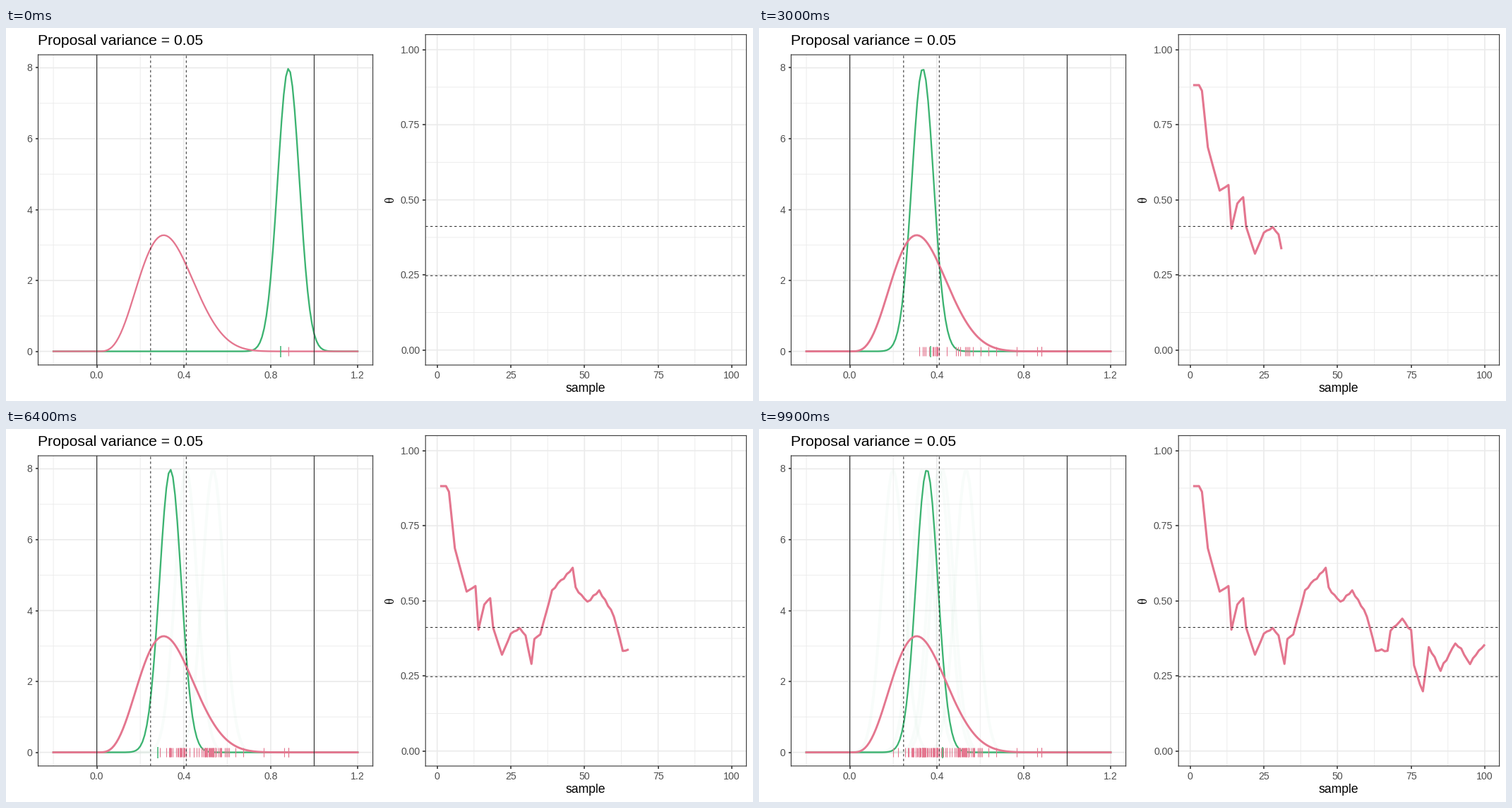
A matplotlib script for the animation above (10000 ms loop, 1058x529 px).

```python
import numpy as np
import matplotlib.pyplot as plt
from matplotlib.animation import FuncAnimation

W, H, DPI = 1058, 529, 100
PX = 72 / DPI  # points per pixel
PINK, GREEN = "#E4768F", "#3CB371"
GRID, DARK, LABEL = "#EBEBEB", "#333333", "#4D4D4D"
SD = 0.05
N = 100
BOUNDS = (0.2475, 0.4115)

# Turning points of the chain (sample: theta), joined by a slightly noisy walk.
TURNS = {3: .882, 4: .863, 6: .675, 10: .53, 13: .55, 14: .403, 16: .489,
         18: .51, 19: .411, 22: .32, 25: .39, 28: .41, 30: .385, 32: .29,
         33: .373, 35: .39, 39: .535, 46: .61, 47: .545, 51: .495, 55: .536,
         60: .445, 63: .335, 67: .333, 68: .40, 72: .44, 75: .40, 76: .29,
         79: .195, 81: .35, 85: .272, 90: .36, 95: .298, 100: .357}

rng = np.random.default_rng(5)
samples = np.arange(1, N + 1)
chain = np.interp(samples, list(TURNS), list(TURNS.values()))
chain += rng.normal(0, 0.005, N) * samples / N
proposal = chain + rng.normal(0, SD, N)

x = np.linspace(-0.2, 1.2, 141)


def normal(mean):
    return np.exp(-((x - mean) / SD) ** 2 / 2) / (SD * np.sqrt(2 * np.pi))


def beta_5_10():
    t = np.clip(x, 0, 1)
    return 10010 * t ** 4 * (1 - t) ** 9


plt.rcParams["font.family"] = "Liberation Sans"
fig = plt.figure(figsize=(W / DPI, H / DPI), dpi=DPI, facecolor="white")


def label(px, py, text, size, color="black", **kw):
    fig.text(px / W, 1 - py / H, text, fontsize=size * PX, color=color,
             **{"va": "baseline", **kw})


def panel(box, xlim, ylim, xticks, yticks, xfmt, yfmt):
    left, top, right, bottom = box
    ax = fig.add_axes([left / W, 1 - bottom / H,
                       (right - left) / W, (bottom - top) / H])
    ax.set(xlim=xlim, ylim=ylim, xticks=xticks, yticks=yticks)
    ax.tick_params(length=4.4 * PX, width=1.6 * PX, color=DARK,
                   labelbottom=False, labelleft=False)
    for spine in ax.spines.values():
        spine.set(linewidth=1.1 * PX, color=DARK, zorder=9, snap=False)

    def grid(ticks, lim, draw):
        half = (ticks[1] - ticks[0]) / 2
        for t in [ticks[0] - half] + [t + half for t in ticks]:
            if lim[0] < t < lim[1]:
                draw(t, color=GRID, lw=0.9 * PX, zorder=0, snap=False)
        for t in ticks:
            draw(t, color=GRID, lw=1.7 * PX, zorder=0.5, snap=False)

    grid(xticks, xlim, ax.axvline)
    grid(yticks, ylim, ax.axhline)
    for t in xticks:
        px = left + (t - xlim[0]) / (xlim[1] - xlim[0]) * (right - left)
        label(px, 497, format(t, xfmt), 14.1, LABEL, ha="center")
    for t in yticks:
        py = bottom - (t - ylim[0]) / (ylim[1] - ylim[0]) * (bottom - top)
        label(left - 8, py + 5, format(t, yfmt), 14.1, LABEL, ha="right")
    return ax


density = panel((45.5, 38, 519.6, 477.9), (-0.27, 1.27), (-0.384, 8.368),
                [0, .4, .8, 1.2], [0, 2, 4, 6, 8], ".1f", "d")
trace_ax = panel((594.2, 9.4, 1048.6, 478), (-3.95, 104.95), (-.05, 1.05),
                 [0, 25, 50, 75, 100], [0, .25, .5, .75, 1], "d", ".2f")

label(45, 24.3, "Proposal variance = 0.05", 21.1)
label(821, 516.3, "sample", 17.6, ha="center")
label(544.5, 243.5, "θ", 17.6, ha="center", va="center", rotation=90,
      family="Liberation Serif")

for edge in (0, 1):
    density.axvline(edge, color=DARK, lw=1.2 * PX, zorder=6, snap=False)
dash = dict(color="#222222", lw=PX, ls=(0, (3.4, 3.4)), zorder=7, snap=False)
for b in BOUNDS:
    density.axvline(b, **dash)
    trace_ax.axhline(b, **dash)

# A few proposal curves stay behind as faint after-images.
ghosts = {n: density.plot(x, normal(chain[n - 1]), color=GREEN, alpha=0.03,
                          lw=4 * PX, zorder=1)[0] for n in range(55, 80, 6)}
curve, = density.plot([], [], color=GREEN, lw=2.3 * PX, zorder=3)
target, = density.plot(x, beta_5_10(), color=PINK, zorder=4)
rug = density.vlines([], 0, 0, color=PINK, lw=1.1 * PX, zorder=5)
mark, = density.plot([], [], color=GREEN, lw=1.5 * PX, zorder=5.5,
                     solid_capstyle="butt")
trace, = trace_ax.plot([], [], color=PINK, lw=3.1 * PX, zorder=3,
                       solid_capstyle="butt")


def update(i):
    n = i + 1
    curve.set_data(x, normal(chain[i]))
    # Repeated overdraw thickens the density line during the first samples.
    target.set_linewidth((2.3 + 0.6 * (1 - np.exp(-i / 3))) * PX)
    rug.set_segments([[(t, -.125), (t, .125)] for t in chain[:n]])
    mark.set_data([proposal[i]] * 2, [-.17, .16])
    trace.set_data(samples[:n], chain[:n])
    for born, ghost in ghosts.items():
        ghost.set_visible(n > born)
    return [curve, target, rug, mark, trace, *ghosts.values()]


anim = FuncAnimation(fig, update, frames=N, interval=100, repeat=True,
                     repeat_delay=0, blit=False)
plt.show()
```
